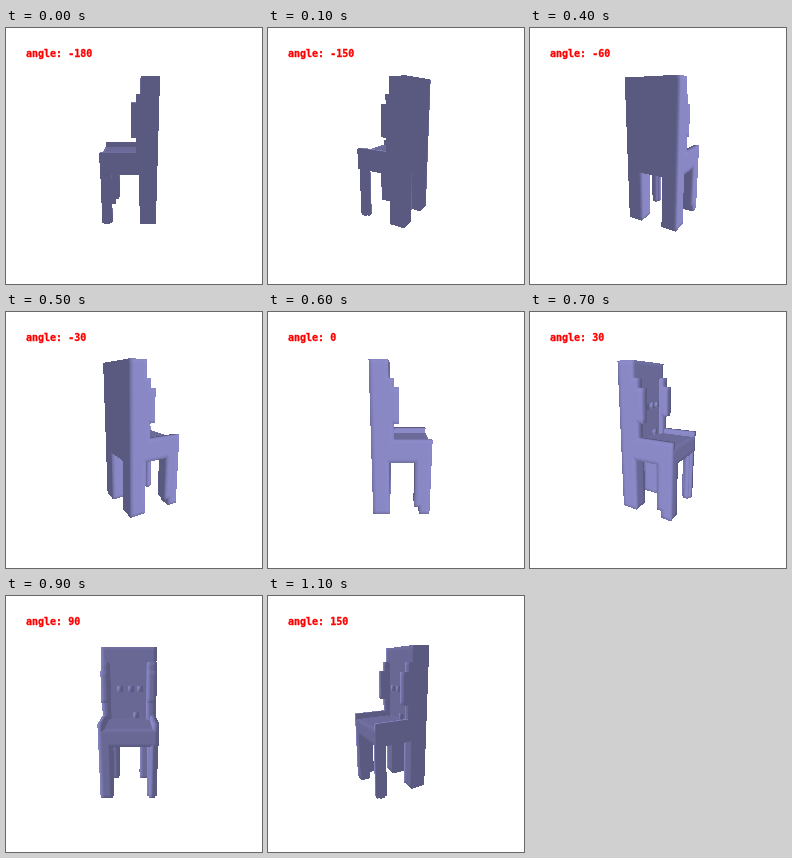
An HTML page with a canvas that plays this animation: 256x256 px, repeating every 1.2 s.

```html
<!DOCTYPE html>
<html lang="en">
<head>
<meta charset="utf-8">
<title>Turning chair</title>
<style>
  html, body { margin: 0; width: 100%; height: 100%; overflow: hidden; background: #fff; }
  canvas { position: absolute; left: 0; top: 0; }
  #label {
    position: absolute; left: 20px; top: 20px;
    font: bold 10px/12px "DejaVu Sans Mono", "Liberation Mono", monospace;
    color: #f00; -webkit-text-stroke: 0.3px #f00; white-space: pre;
  }
</style>
</head>
<body>
<canvas id="stage" width="256" height="256"></canvas>
<div id="label">angle: -180</div>
<script>
const ctx = document.getElementById('stage').getContext('2d');
const label = document.getElementById('label');

const STEP_MS = 100, STEPS = 12;
const DIST = 221.7, TILT = Math.PI / 12;
const COS_T = Math.cos(TILT), SIN_T = Math.sin(TILT);
const VIEW = { x: 60, y: 20, w: 118, h: 194 };
const LIGHT = [0.28, -0.9, 0.33];
const SHADE = [90, 90, 128], GLOW = [52, 50, 76];
const SOFT = 6.5;

// Axes: depth (front is +), side, height. Each box is [d0, d1, s0, s1, h0, h1].
const boxes = [
  [-21.4, -6, -31.3, 21.5, -12.4, 73.6],      // back rest
  [-21.4, -6, -31.3, -16.2, -63.3, 0],        // back legs
  [-21.4, -6, 6.4, 21.5, -63.3, 0],
  [-12, 31.3, -31.3, 21.5, -12.4, 3.5],       // seat
  [-12, 31.3, -31.3, -26, -12.4, 8.3],        // seat rims
  [-12, 31.3, 16.2, 21.5, -12.4, 8.3],
  [17, 31.3, -31.3, -19.5, -56, 0],           // front legs
  [21.5, 31.3, -31.3, -19.5, -63.3, 0],
  [21.4, 31.3, 14.5, 19.5, -63.3, 0],
  [24, 29, 12.2, 21.5, -63.3, 0]
];
for (const [s0, s1] of [[-31.3, -23.5], [12.5, 21.5]]) {
  boxes.push([-14, -2.1, s0, s1, 0, 59.5]);   // wings of the back rest
  boxes.push([-14, 2.7, s0, s1, 22, 51.3]);
}
for (const [s, h] of [[-13.7, 34], [-3, 34.5], [6, 34.5], [2, 8]]) {
  boxes.push([-12, -3.8, s - 2.8, s + 2.8, h - 2.8, h + 2.8]);
}

function ramp(x) {
  const t = Math.min(1, Math.max(0, x / SOFT + 0.5));
  return t * t * (3 - 2 * t);
}

// Softened solidity at a point; its slope gives rounded normals.
function solid(p) {
  let best = 0;
  for (const b of boxes) {
    let v = 1;
    for (let i = 0; i < 3 && v > best; i++) {
      v *= ramp(p[i] - b[2 * i]) * ramp(b[2 * i + 1] - p[i]);
    }
    if (v > best) best = v;
  }
  return best;
}

function lightAt(p) {
  let dot = 0, len = 0;
  for (let i = 0; i < 3; i++) {
    const a = p.slice(), b = p.slice();
    a[i] -= 0.8;
    b[i] += 0.8;
    const n = solid(a) - solid(b);
    dot += n * LIGHT[i];
    len += n * n;
  }
  return len ? Math.max(0, dot / Math.sqrt(len)) : 0;
}

function hit(from, dir) {
  let nearest = Infinity;
  for (const b of boxes) {
    let enter = 0, leave = nearest;
    for (let i = 0; i < 3 && enter < leave; i++) {
      const t0 = (b[2 * i] - from[i]) / dir[i];
      const t1 = (b[2 * i + 1] - from[i]) / dir[i];
      enter = Math.max(enter, Math.min(t0, t1));
      leave = Math.min(leave, Math.max(t0, t1));
    }
    if (enter < leave) nearest = enter;
  }
  return nearest;
}

function render(angle) {
  const a = angle * Math.PI / 180 + 1e-6;
  const ca = Math.cos(a), sa = Math.sin(a);
  // right, up and toward the viewer -> chair axes
  const toChair = (right, up, near) => {
    const u = near * COS_T - up * SIN_T;
    return [right * ca + u * sa, right * sa - u * ca, near * SIN_T + up * COS_T];
  };
  const eye = toChair(0, 0, DIST);
  const img = ctx.createImageData(VIEW.w, VIEW.h);
  for (let y = 0; y < VIEW.h; y++) {
    for (let x = 0; x < VIEW.w; x++) {
      const sx = VIEW.x + x + 0.501, sy = VIEW.y + y + 0.501;
      const dir = toChair((sx - 128) / DIST, (128 - sy) / DIST, -1);
      const t = hit(eye, dir);
      if (t === Infinity) continue;
      const lit = lightAt(eye.map((e, i) => e + dir[i] * t));
      const o = 4 * (y * VIEW.w + x);
      for (let c = 0; c < 3; c++) img.data[o + c] = SHADE[c] + GLOW[c] * lit;
      img.data[o + 3] = 255;
    }
  }
  return img;
}

const views = [];
let shown = -1;

function draw() {
  const step = Math.floor(performance.now() / STEP_MS) % STEPS;
  if (step !== shown) {
    const angle = -180 + step * 360 / STEPS;
    views[step] = views[step] || render(angle);
    ctx.putImageData(views[step], VIEW.x, VIEW.y);
    label.textContent = 'angle: ' + angle;
    shown = step;
  }
  requestAnimationFrame(draw);
}
draw();
</script>
</body>
</html>
```
